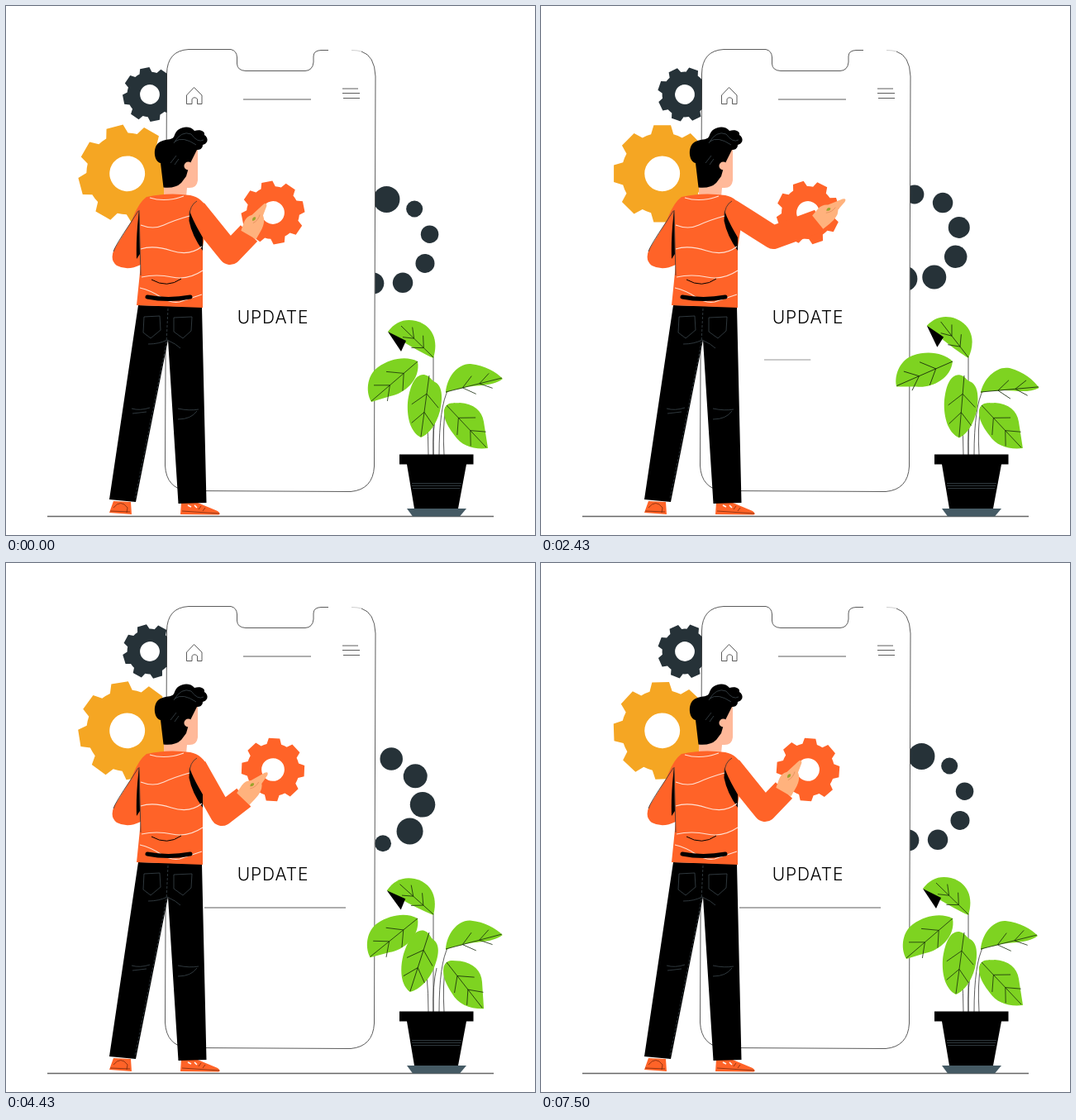
Animation of 640x640 px, one loop 7.71 s. Source, as an HTML page:

```html
<!DOCTYPE html>
<html>
<head>
<meta charset="utf-8">
<style>
html, body { margin: 0; width: 100%; height: 100%; overflow: hidden; background: #fff; }
svg { display: block; width: 100vw; height: 100vh; }
.thin { fill: none; stroke: #333; stroke-width: .8; }
.seam { fill: none; stroke: #3c474d; stroke-width: .8; }
.pale { fill: none; stroke: #ffe0d2; stroke-width: 1.1; }
.dark { fill: #263238; }
.orange { fill: #ff6328; }
.skin { fill: #ffb99a; }
.leaf { fill: #7ed321; }
.vein { fill: none; stroke: #172b0c; stroke-width: .8; }
</style>
</head>
<body>
<svg viewBox="0 0 640 640">
  <path d="M50 617.5H590" stroke="#666" stroke-width="1.3"/>
  <g id="loader" class="dark"></g>
  <path id="grey" class="dark" fill-rule="evenodd"/>
  <path id="yellow" fill="#f5a623" fill-rule="evenodd"/>

  <!-- phone -->
  <path fill="#fff" d="M195 82Q195 53 221 53H272Q279 55 279 62V70Q281 78 290 78H362Q371 77 371 68V61Q373 54 381 54H420Q446 56 447 85L446 557Q444 586 417 587L220 586Q194 584 192 556Z"/>
  <path class="thin" d="M390 53.5H381Q372 54 372 61V68Q371 78 362 78.500H290Q280 78 279.500 70V62Q279 54 272 52.500H221Q195 54 194.500 82L192.500 556Q194 584 220 586.500L417 587.500Q444 585 445.500 557L447 85Q446 60 430 55"/>
  <path class="thin" stroke-opacity=".3" d="M430 55Q425 53.500 418 53.500"/>
  <path class="thin" d="M218.500 118.500V108L227.500 98.500 237 108V118.500H231.500V112.500Q228 109 225 112.500V118.500ZM407 100H426M407 105.500H428M408 111.500H428"/>
  <path class="thin" d="M287 113H369"/>
  <text x="323" y="384" text-anchor="middle" font-family="Inter, sans-serif" font-weight="300" font-size="21" letter-spacing=".9">UPDATE</text>
  <path id="line1" class="thin"/>
  <path id="line2" class="thin" stroke-opacity=".65"/>
  <path id="gear" class="orange" fill-rule="evenodd"/>

  <!-- man -->
  <path class="orange" d="M130 599L151 600 152 615 125 613ZM212 601H232L256 611Q261 615 257 615.500L211 615Z"/>
  <path d="M130 607Q139 596 147 607L146 613M126 611L150 612M213 611L258 614M236 605L233 609M241 607L238 611" fill="none" stroke="#7a2a0c" stroke-width=".8"/>
  <path d="M220 604L224 606M228 604L231 607" stroke="#fff" stroke-width="1.5"/>
  <path d="M160 362L237 364 242.500 601 208.500 602 196 404 157 600 125 597Z"/>
  <path class="seam" d="M167 376L186 375 187 392 175 402 166 395ZM203 377L225 376 224 393 214 402 203 394ZM172 409Q185 409 195 404Q206 409 211 414M152 487Q162 490 174 486M153 493L170 491M208 487Q222 490 233 488M208 500Q224 500 231 490"/>
  <path class="seam" stroke-dasharray="3 2" d="M196 366L194 408 156 597"/>
  <path class="skin" d="M232 172V211Q231 220 222 220H219L218 231H191V212L216 184Z"/>
  <path d="M190.500 219.500L187 190C178 188 177 168 187 164C196 160 202 163 204 156C207 146 222 143 228 151C236 149 241 152 240 156C246 160 244 167 238 168C238 173 234 174 231 174L222 192 218 206 212 214Q205 221 190.500 219.500Z"/>
  <circle class="skin" cx="220.500" cy="193.500" r="5"/>
  <path class="seam" d="M203 166Q212 150 224 155Q232 166 239 162M204 164Q214 157 230 168M199 190L206 181M204 192L209 185"/>
  <path class="orange" d="M170 231Q196 225 223 229Q238 232 245 248L238 292V365L158 362 163 313Q147 321 134 314Q125 307 131 294L152 260Q160 238 170 231Z"/>
  <path id="arm" fill="none" stroke="#ff6328" stroke-width="28" stroke-linejoin="round"/>
  <g id="hand">
    <path fill="#ffb27d" d="M-2 -10L9 -12Q16 -13 21 -8L39 -2.500Q44 0 39 2L27 4Q22 11 8 11L-2 11Z"/>
    <path d="M15 -4Q19 -7 21 -3Q18 0 15 -4" fill="#9aa32b"/>
    <path d="M13 -2Q19 2 26 0" fill="none" stroke="#e08a58" stroke-width=".7"/>
  </g>
  <path d="M222 247Q225 258 238 280V296Q225 278 221.500 260ZM161 247Q157 280 158 306L162 300Z"/>
  <path class="thin" d="M231 236Q222 241 222 255M160 248L151 262Q132 290 130 297M161 247L163 326"/>
  <path class="pale" d="M174 232Q193 238 215 230M163 265Q178 271 191 265T222 254M163 294Q178 289 200 296T237 291M164 328Q182 324 201 328T238 320M162 341Q175 344 187 352T210 358L237 349"/>
  <path d="M176 331Q195 342 212 330" fill="none" stroke="#000"/>
  <path d="M171 352Q196 357 223 352" fill="none" stroke="#000" stroke-width="5" stroke-linecap="round"/>

  <!-- plant -->
  <path class="thin" d="M517 424V543M509 498Q511 520 511 543M521 490Q516 510 517 543M535 464Q524 485 524 543M532 485Q528 510 530 543"/>
  <g id="leaves"></g>
  <path d="M485 608H557L549 617.500H492Z" fill="#455a64"/>
  <path d="M476 542.500H565.500V554.500H557L547 608H494L485 554.500H476Z"/>
  <path class="seam" d="M491 577.500H551M491 580.500H550M492 583.500H549"/>
</svg>
<script>
const $ = id => document.getElementById(id);
const NS = 'http://www.w3.org/2000/svg';
const add = (parent, tag, attrs) => {
  const el = parent.appendChild(document.createElementNS(NS, tag));
  for (const k in attrs) el.setAttribute(k, attrs[k]);
  return el;
};
const RAD = Math.PI / 180;
const polar = (r, deg) => [r * Math.cos(deg * RAD), r * Math.sin(deg * RAD)];

const LOOP = 7710, SPAN = 7.5, STEP = SPAN / 105;
const ROLL_TIME = 7.14, LAP = ROLL_TIME / 2, REST = .36;
const TIMES = [0, 1.071, 2.429, 3.643, 5.286, 6.5];
const ARM_TIMES = [.073, REST, 1.071, 1.716, 2.429, 2.93];

// Smooth curve through keys; each period adds drift to the value.
function curve(t, times, values, period, drift = 0) {
  const n = times.length;
  const at = i => {
    const lap = Math.floor(i / n), j = i - lap * n;
    return [times[j] + lap * period, values[j] + lap * drift];
  };
  let i = n - 1;
  while (times[i] > t) i--;
  const [a, b, c, d] = [i - 1, i, i + 1, i + 2].map(at);
  const h = c[0] - b[0], u = (t - b[0]) / h;
  const m0 = (c[1] - a[1]) / (c[0] - a[0]) * h, m1 = (d[1] - b[1]) / (d[0] - b[0]) * h;
  const u2 = u * u, u3 = u2 * u;
  return (2 * u3 - 3 * u2 + 1) * b[1] + (u3 - 2 * u2 + u) * m0
    + (3 * u2 - 2 * u3) * c[1] + (u3 - u2) * m1;
}
const slow = (t, values, drift) => curve(t, TIMES, values, SPAN, drift);
// The arm rests briefly, then its hand goes round in laps.
const reach = (t, values) => curve(Math.max(t, REST) % LAP, ARM_TIMES, values, LAP);

function gearPath(R) {
  const root = R * .83, hole = R * .36;
  let d = '';
  for (let i = 0; i < 8; i++) {
    const mid = i * 45 - 90;
    const [a, b, c, e] = [polar(root, mid - 16), polar(R, mid - 10), polar(R, mid + 10), polar(root, mid + 16)];
    d += `${i ? `A${root} ${root} 0 0 1 ` : 'M'}${a}L${b}L${c}L${e}`;
  }
  return d + `A${root} ${root} 0 0 1 ${polar(root, -106)}Z`
    + `M${hole} 0A${hole} ${hole} 0 1 0 ${-hole} 0A${hole} ${hole} 0 1 0 ${hole} 0Z`;
}
$('grey').setAttribute('d', gearPath(33));
$('yellow').setAttribute('d', gearPath(59.5));
$('gear').setAttribute('d', gearPath(38.5));
const turn = (id, x, y, deg) => $(id).setAttribute('transform', `translate(${x} ${y}) rotate(${deg})`);

const dots = Array.from({length: 9}, (_, k) => add($('loader'), 'circle', {r: 10 + .75 * k}));

function veins([x, y], [tx, ty], width) {
  const dx = tx - x, dy = ty - y, len = Math.hypot(dx, dy);
  const nx = -dy / len * width, ny = dx / len * width;
  let d = `M${x} ${y}L${tx} ${ty}`;
  for (const s of [.3, .6]) for (const side of [-1, 1]) {
    const px = x + dx * s, py = y + dy * s, k = side * (1.2 - s * .6);
    d += `M${px} ${py}L${px + dx * .2 + nx * k} ${py + dy * .2 + ny * k}`;
  }
  return d;
}
const leaves = [
  {base: [517, 425], tip: [478, 387], w: 10, sway: t => slow(t, [0, 5, 8, 0, -2.5, 5]),
    d: 'M517 426Q489 413 462 394C471 382 482 378 496 381C515 386 524 403 517 426Z', fold: 'M462 394L484 405 478 418Z'},
  {base: [498, 430], tip: [442, 478], w: 15, sway: t => slow(t, [0, 10, 17, 5, 0, 1]),
    d: 'M498 430C502 452 482 469 465 472L442 479C434 465 438 445 450 437C465 426 485 423 498 430Z'},
  {base: [512, 447], tip: [502, 521], w: 16, sway: t => slow(t, [0, -4, -3, 8, 10, 3]),
    d: 'M506 446C514 448 514 453 519 455C529 460 528 476 525 490C520 508 511 518 502 522C488 515 485 495 486 480C488 462 494 445 506 446Z'},
  {base: [532, 467], tip: [600, 450], w: 11, sway: t => slow(t, [0, 14, 9, -7.5, 7.5, -5]),
    d: 'M532 468C533 449 547 432 562 433C580 435 593 443 601 451C586 462 566 457 550 463Q540 464 532 468Z'},
  {base: [533, 483], tip: [581, 534], w: 15, sway: t => 6 * (1 - Math.cos(t / 2.5 * 2 * Math.PI)),
    d: 'M530 489C533 478 541 481 549 480C566 481 576 490 578 503L583 535C566 537 551 532 543 520C536 511 529 501 530 489Z'},
];
for (const leaf of leaves) {
  leaf.el = add($('leaves'), 'g', {});
  add(leaf.el, 'path', {d: leaf.d, class: 'leaf'});
  if (leaf.fold) add(leaf.el, 'path', {d: leaf.fold});
  add(leaf.el, 'path', {d: veins(leaf.base, leaf.tip, leaf.w), class: 'vein'});
}

const ramp = (t, a, b) => Math.max(0, Math.min(1, (t - a) / (b - a)));
function drawLine(id, x, y, length) {
  $(id).setAttribute('d', length > 0 ? `M${x} ${y}h${length}` : '');
}

function draw(t) {
  const spin = slow(t, [-15, -64, -135, -195, -276, -333], -347);
  turn('yellow', 146.7, 202.8, spin);
  turn('grey', 174, 107, -26 - spin);
  turn('gear', 323, 250, slow(t, [-11, -58, -108, -176, -273, -337], -345));

  const roll = -360 * ramp(t, 0, ROLL_TIME);
  const [ox, oy] = polar(5, 15 + roll);
  dots.forEach((dot, k) => {
    const [x, y] = polar(52.2, 40 * k - 51 + roll);
    dot.setAttribute('cx', 456.5 + ox + x);
    dot.setAttribute('cy', 284.8 + oy + y);
  });

  const ex = reach(t, [278, 271, 259, 264, 281, 287]), ey = reach(t, [303, 299, 305, 296, 280, 278]);
  const wx = reach(t, [304, 294, 289, 315, 336, 326]), wy = reach(t, [258, 275, 285, 279, 260, 247]);
  $('arm').setAttribute('d', `M229 247L${ex} ${ey}L${wx} ${wy}`);
  turn('hand', wx, wy, reach(t, [-73, -60, -42, -35.5, -39, -62]));

  for (const {el, base, sway} of leaves) el.setAttribute('transform', `rotate(${sway(t)} ${base})`);

  drawLine('line1', 240, 417, 171 * (t < 2.3 ? ramp(t, 0, 2.08) : ramp(t, 2.45, 3.6)));
  drawLine('line2', 270, 428, t < 4.2 ? 66 * ramp(t, 1.9, 2.52) : 0);
}

const start = performance.now();
function tick() {
  const ms = (performance.now() - start) % LOOP;
  draw(Math.min(105, Math.floor((ms + 5) / 1000 / STEP)) * STEP);
  requestAnimationFrame(tick);
}
tick();
</script>
</body>
</html>
```
